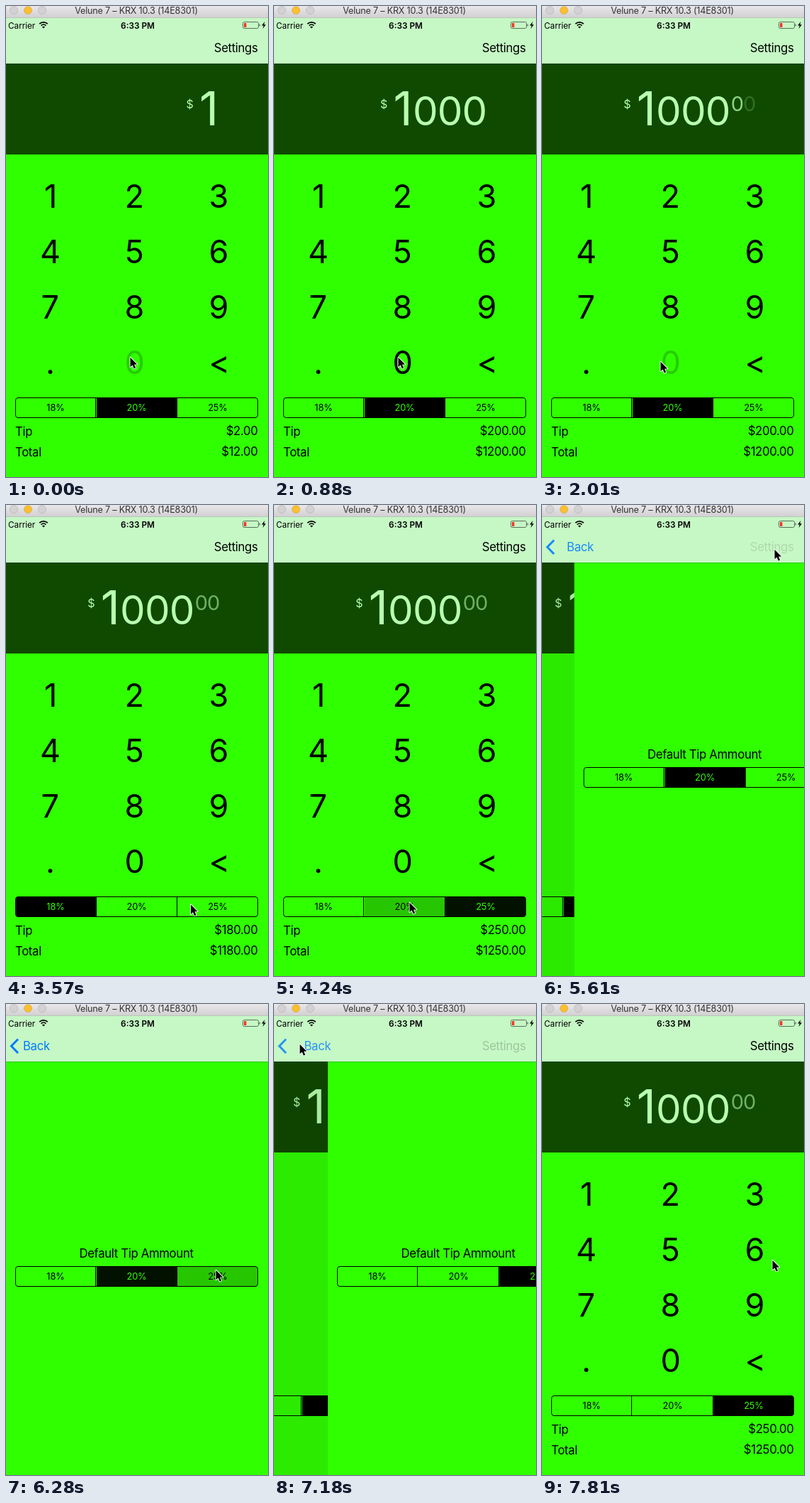
These frames come from a looping animation (370 px wide and 663 px high, 8000 ms). An HTML page with a canvas:

```html
<!DOCTYPE html>
<html lang="en">
<head>
<meta charset="utf-8">
<title>Tip calculator</title>
<style>
html, body { margin: 0; width: 100%; height: 100%; overflow: hidden; }
canvas { display: block; width: 370px; height: 663px; }
</style>
</head>
<body>
<canvas id="stage"></canvas>
<script>
const W = 370, H = 663, LOOP = 8000;
const GREEN = '#30ff00', PANEL = '#0f4a00', PALE = '#b9ffaf', NAV = '#c6f8c5', BLUE = '#007aff';
const RATES = [18, 20, 25];
const ROWS = ['123', '456', '789', '.0<'];
const SLOT = 34.8;
const HOLD = 175, TRAVEL = 250, PUSH = 420;

const canvas = document.getElementById('stage');
const ctx = canvas.getContext('2d');
const ratio = window.devicePixelRatio || 1;
canvas.width = W * ratio;
canvas.height = H * ratio;

// What the pointer visits: name, x, y and the time the button is released.
const VISITS = [
  ...[60, 310, 570].map(time => ['0', 175, 494, time]),
  ['.', 57, 500, 1440], ['0', 167, 500, 1850], ['0', 167, 500, 2180],
  ['18%', 68, 566, 3120], ['25%', 292, 561, 3805], ['20%', 191, 559, 4400],
  ['', 286, 42, 5015], ['Settings', 328, 62, 5400],
  ['25%', 296, 374, 6400], ['Back', 36, 56, 7150], ['', 325, 360, 7975]
].map(([name, x, y, up]) => ({ name, x, y, up, down: up - HOLD }));

const releases = name => VISITS.filter(v => v.name === name).map(v => v.up);
const [OPEN] = releases('Settings');
const [CLOSE] = releases('Back');
const [DOT] = releases('.');
const ZEROS = releases('0').filter(up => up < DOT);
const CENTS = releases('0').filter(up => up > DOT);

const clamp = v => Math.max(0, Math.min(1, v));
const progress = (t, from, length) => clamp((t - from) / length);
const smooth = v => v * v * (3 - 2 * v);
const easeOut = v => 1 - (1 - v) ** 3;
const mix = (a, b, v) => a + (b - a) * v;
const isHeld = (name, t) => VISITS.some(v => v.name === name && t >= v.down && t < v.up);

function chosenRate(t) {
  const last = VISITS.filter(v => v.name.endsWith('%') && v.up <= t).pop();
  return last ? parseInt(last.name) : 20;
}

function spring(t, start) {
  const u = progress(t, start, 310);
  return u === 1 ? 1 : 1 - Math.exp(-5 * u) * Math.cos(10 * u);
}

function face(size, weight = 400) {
  ctx.font = `${weight} ${size}px Inter, "Open Sans", sans-serif`;
}

function label(str, x, y, { size = 16.8, weight = 400, color = '#000', align = 'left', track = -0.36 } = {}) {
  face(size, weight);
  ctx.letterSpacing = track + 'px';
  ctx.textAlign = align;
  ctx.fillStyle = color;
  ctx.fillText(str, x, y);
  ctx.letterSpacing = '0px';
}

// Centres the visible shape of a glyph on cx.
function glyph(str, cx, y, size, color) {
  face(size);
  ctx.textAlign = 'left';
  const m = ctx.measureText(str);
  ctx.fillStyle = color;
  ctx.fillText(str, cx - (m.actualBoundingBoxRight - m.actualBoundingBoxLeft) / 2, y);
}

function box(x, y, w, h, color) {
  ctx.fillStyle = color;
  ctx.fillRect(x, y, w, h);
}

function polygon(...points) {
  ctx.beginPath();
  points.forEach(([x, y]) => ctx.lineTo(x, y));
  ctx.closePath();
}

function faded(alpha, draw) {
  ctx.save();
  ctx.globalAlpha *= clamp(alpha);
  draw();
  ctx.restore();
}

function shifted(x, draw) {
  ctx.save();
  ctx.translate(x, 0);
  draw();
  ctx.restore();
}

function titleBar() {
  const shade = ctx.createLinearGradient(0, 0, 0, 16);
  shade.addColorStop(0, '#e9e7e9');
  shade.addColorStop(1, '#d2d0d2');
  box(0, 0, W, 16, shade);
  box(0, 16, W, 1, '#b9c8b7');
  ['#d3d1d3', '#fdbe2f', '#d3d1d3'].forEach((fill, i) => {
    ctx.beginPath();
    ctx.arc(11 + 20 * i, 6, 5.6, 0, 7);
    ctx.fillStyle = fill;
    ctx.fill();
    ctx.lineWidth = 0.8;
    ctx.strokeStyle = 'rgba(90,70,60,.22)';
    ctx.stroke();
  });
  label('Velune 7 – KRX 10.3 (14E8301)', 184, 11, { size: 12.6, color: '#333', align: 'center', track: -0.2 });
}

function statusBar() {
  label('Carrier', 3, 31.5, { size: 11.8, track: -0.05 });
  ctx.strokeStyle = '#000';
  ctx.lineWidth = 1.7;
  [4.8, 8.2].forEach(r => {
    ctx.beginPath();
    ctx.arc(53, 31, r, -Math.PI * 0.75, -Math.PI * 0.25);
    ctx.stroke();
  });
  ctx.fillStyle = '#000';
  polygon([53, 31.6], [50.9, 29.4], [53, 28.5], [55.1, 29.4]);
  ctx.fill();
  label('6:33 PM', 186, 31.5, { size: 11.8, weight: 600, align: 'center', track: 0 });
  ctx.lineWidth = 1;
  ctx.strokeStyle = '#56705a';
  ctx.beginPath();
  ctx.roundRect(334.5, 22.5, 22, 9, 2);
  ctx.stroke();
  box(336, 24, 3.4, 6, '#ff3126');
  box(357.5, 25.5, 1.3, 3, '#56705a');
  ctx.fillStyle = '#000';
  polygon([365.5, 22], [361, 27.6], [363.8, 27.6], [362.5, 32], [367, 26.2], [364.3, 26.2]);
  ctx.fill();
}

function segments(y, chosen, t) {
  const left = 13.5, width = 342, part = width / 3;
  const frame = () => {
    ctx.beginPath();
    ctx.roundRect(left, y + 0.5, width, 28, 3.5);
  };
  const held = RATES.find(rate => isHeld(rate + '%', t));
  ctx.save();
  frame();
  ctx.clip();
  RATES.forEach((rate, i) => {
    const shade = rate === chosen ? (held ? 0.93 : 1) : rate === held ? 0.22 : 0;
    box(Math.round(left + part * i), y, part, 29, `rgba(0,0,0,${shade})`);
  });
  ctx.restore();
  ctx.lineWidth = 1;
  ctx.strokeStyle = '#000';
  frame();
  [1, 2].forEach(i => {
    const x = Math.floor(left + part * i) - 0.5 + (i - 1);
    ctx.moveTo(x, y);
    ctx.lineTo(x, y + 29);
  });
  ctx.stroke();
  RATES.forEach((rate, i) => label(rate + '%', 70 + 114.5 * i, y + 19, {
    size: 12.8, align: 'center', color: rate === chosen ? GREEN : '#000', track: -0.1
  }));
}

function amount(t) {
  ctx.save();
  ctx.beginPath();
  ctx.rect(0, 81, W, 128);
  ctx.clip();
  box(0, 81, W, 128, PANEL);
  const moves = [...ZEROS, DOT].map(start => spring(t, start));
  const offset = from => SLOT * moves.slice(from).reduce((a, b) => a + b, 0);
  glyph('$', 259.5 - offset(0), 143.5, 16, PALE);
  glyph('1', 285.5 - offset(0), 168, 66.5, PALE);
  ZEROS.forEach((start, i) => {
    const drop = 60 * (1 - easeOut(progress(t, start, 240)));
    faded(progress(t, start, 200), () => glyph('0', 283.5 - offset(i + 1), 168 - drop, 56.5, PALE));
  });
  const show = easeOut(progress(t, DOT, 280));
  const [first, second] = CENTS.map(start => progress(t, start, 160));
  const levels = [mix(mix(0.2, 0.75, first), 0.57, second), mix(0.2, 0.57, second)];
  levels.forEach((alpha, i) =>
    faded(alpha * show, () => glyph('0', 275.7 + 17.4 * i, 147.5 - 15 * (1 - show), 29, PALE)));
  ctx.restore();
}

function keyAlpha(key, t) {
  if (isHeld(key, t)) return 0.2;
  const last = releases(key).filter(up => up <= t).pop();
  return last ? mix(0.2, 1, progress(t, last, 240)) : 1;
}

function keypad(t) {
  ROWS.forEach((row, r) => [...row].forEach((key, c) =>
    faded(keyAlpha(key, t), () => glyph(key, 62.5 + 119 * c, 284 + 78 * r, 45, '#000'))));
}

function mainView(t) {
  box(0, 81, W, H - 81, GREEN);
  amount(t);
  keypad(t);
  // A choice made in the settings appears once this view is back.
  const returned = t >= CLOSE + PUSH;
  const shown = returned ? t : Math.min(t, OPEN);
  const rate = chosenRate(shown);
  segments(551, rate, shown);
  const bill = 10 ** ZEROS.filter(up => t >= up - 60).length;
  const tip = bill * rate / 100;
  [['Tip', tip], ['Total', bill + tip]].forEach(([name, value], i) => {
    label(name, 13, 604.5 + 29 * i);
    label('$' + value.toFixed(2), 355.5, 603.5 + 29 * i, { align: 'right' });
  });
}

function settingsView(t) {
  box(0, 81, W, H - 81, GREEN);
  label('Default Tip Ammount', 184, 356.5, { align: 'center' });
  segments(369, chosenRate(t), t);
}

function navigation(t, push) {
  box(0, 16, W, 65, NAV);
  box(0, 81, W, 0.6, 'rgba(0,0,0,.35)');
  const alpha = name => isHeld(name, t) ? 0.2 : 1;
  faded((1 - push) * alpha('Settings'), () => label('Settings', 355.5, 65, { align: 'right' }));
  faded(push * alpha('Back'), () => {
    ctx.strokeStyle = BLUE;
    ctx.lineWidth = 3;
    ctx.beginPath();
    ctx.moveTo(17, 49.5);
    ctx.lineTo(7.5, 59.2);
    ctx.lineTo(17, 69);
    ctx.stroke();
    label('Back', 24 + 90 * (1 - push), 65, { color: BLUE });
  });
}

function pointer(t) {
  const at = { x: VISITS[0].x, y: VISITS[0].y };
  VISITS.forEach(v => {
    const near = smooth(progress(t, v.down - TRAVEL, TRAVEL));
    at.x = mix(at.x, v.x, near);
    at.y = mix(at.y, v.y, near);
  });
  ctx.save();
  ctx.translate(at.x + 0.5, at.y + 0.7);
  ctx.scale(0.88, 0.88);
  polygon([0, 0], [0, 15.5], [3.5, 12.3], [6, 18], [8.7, 16.8], [6.3, 11.3], [11, 11.1]);
  ctx.lineJoin = 'round';
  ctx.lineWidth = 2;
  ctx.strokeStyle = '#fff';
  ctx.stroke();
  ctx.fillStyle = '#000';
  ctx.fill();
  ctx.restore();
}

function render(t) {
  ctx.setTransform(ratio, 0, 0, ratio, 0, 0);
  const push = easeOut(progress(t, OPEN, PUSH)) - easeOut(progress(t, CLOSE, PUSH));
  box(0, 0, W, H, GREEN);
  if (push < 1) {
    shifted(-W * 0.3 * push, () => mainView(t));
    box(0, 81, W, H - 81, `rgba(0,0,0,${0.1 * push})`);
  }
  if (push > 0) shifted(W * (1 - push), () => settingsView(t));
  navigation(t, push);
  titleBar();
  statusBar();
  pointer(t);
}

const began = performance.now();
function tick() {
  render((performance.now() - began) % LOOP);
  requestAnimationFrame(tick);
}
tick();
</script>
</body>
</html>
```
